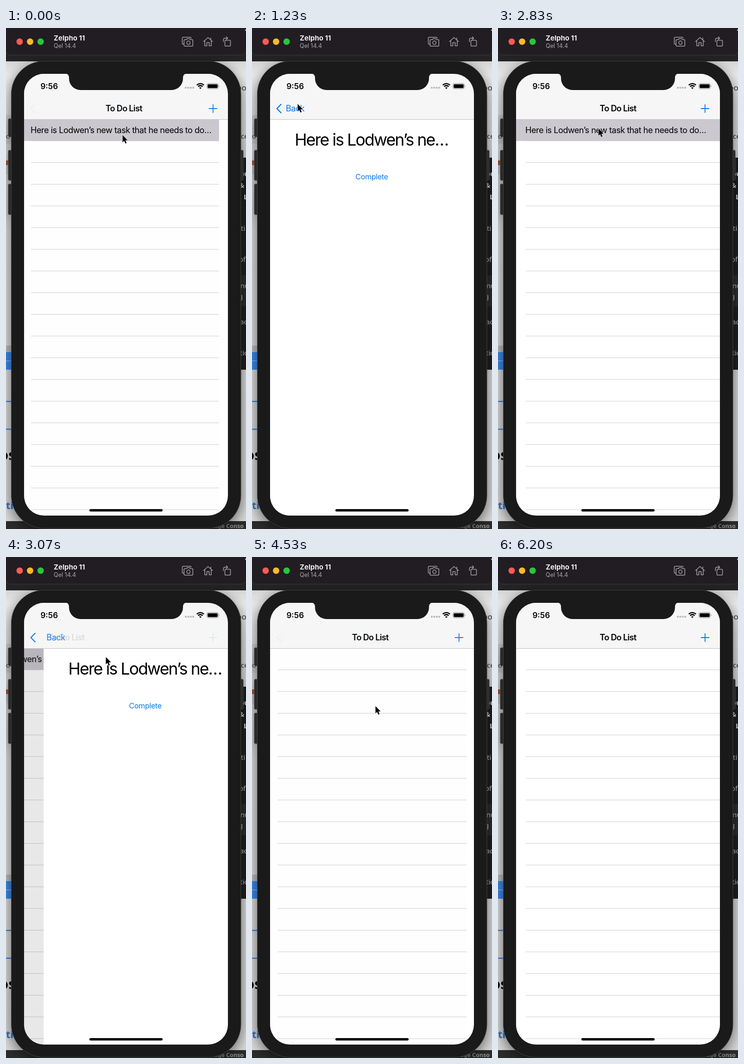
An HTML page that plays this animation: 518x1082 px, repeating every 6.31 s.

```html
<!DOCTYPE html>
<html lang="en">
<head>
<meta charset="utf-8">
<title>To Do List</title>
<style>
  /* 0 = list on screen, 1 = detail on screen */
  @property --p { syntax: '<number>'; inherits: true; initial-value: 0; }

  html, body { margin: 0; width: 100%; height: 100%; overflow: hidden; background: #1c1c1c; }
  svg { display: block; width: 100vw; height: 100vh; }
  text { font-family: Inter, sans-serif; font-optical-sizing: none; white-space: pre; }
  .mid { text-anchor: middle; }
  .line { fill: none; stroke-linecap: round; stroke-linejoin: round; }
  .page text { font-family: "Noto Sans", sans-serif; }

  .phone { filter: drop-shadow(0 8px 15px rgba(0, 0, 0, .55)); }
  .body { font-size: 18.1px; letter-spacing: -.5px; }
  .blue { fill: #0a78ea; }

  .stage { animation: nav 6310ms infinite cubic-bezier(.2833, .99, .3183, .99); }
  .list { transform: translateX(calc(var(--p) * -132px)); }
  .dim { opacity: calc(var(--p) * .1); }
  .detail { transform: translateX(calc((1 - var(--p)) * 441px)); }
  .title { transform: translateX(calc(var(--p) * (-100px - var(--p) * 47px))); }
  .back { transform: translateX(calc((1 - var(--p)) * 150px)); }
  .out { opacity: calc(1 - var(--p)); }
  .in { opacity: var(--p); }
  .task { animation: task 6310ms infinite step-end; }
  .pick { animation: pick 6310ms infinite linear; }
  .cursor { animation: move 6310ms infinite linear; }

  @keyframes nav {
    0% { --p: .039; }
    7.83%, 22.98% { --p: 1; }
    30.9%, 45.54% { --p: 0; }
    53.46%, 67.67% { --p: 1; }
    75.6%, 100% { --p: 0; }
  }
  @keyframes task {
    0% { opacity: 1; }
    67%, 100% { opacity: 0; }
  }
  @keyframes pick {
    0%, 22.98% { opacity: 1; }
    28.5%, 44.3% { opacity: 0; }
    44.31%, 66.9% { opacity: 1; }
    67%, 100% { opacity: 0; }
  }
  @keyframes move {
    0% { transform: translate(251px, 231px); }
    7.1% { transform: translate(252px, 233px); animation-timing-function: ease-in-out; }
    19.5% { transform: translate(98px, 164px); }
    21.1% { transform: translate(91px, 167px); }
    25.5% { transform: translate(92px, 168px); animation-timing-function: ease-in; }
    31.7% { transform: translate(197px, 187px); animation-timing-function: ease-out; }
    37.5% { transform: translate(222px, 216px); }
    45.4% { transform: translate(216px, 217px); }
    48.65% { transform: translate(215px, 216px); animation-timing-function: ease-in; }
    58.2% { transform: translate(253px, 290px); animation-timing-function: ease-out; }
    63% { transform: translate(265px, 320px); }
    71.8% { transform: translate(266px, 322px); }
    78% { transform: translate(267px, 320px); animation-timing-function: ease-in; }
    82.9% { transform: translate(272px, 278px); }
    92.4% { transform: translate(456px, 0); }
    93.2%, 100% { transform: translate(457px, -30px); }
  }
</style>
</head>
<body>
<svg class="stage" viewBox="0 0 518 1082" preserveAspectRatio="none">
  <defs>
    <linearGradient id="paper" x2="0" y2="1">
      <stop offset="0" stop-color="#d6d6d6"/>
      <stop offset=".03" stop-color="#ebebeb"/>
      <stop offset=".16" stop-color="#dedede"/>
      <stop offset="1" stop-color="#dadada"/>
    </linearGradient>
    <clipPath id="screen"><rect x="39" y="99" width="440" height="954" rx="43"/></clipPath>
  </defs>

  <!-- windows behind -->
  <g class="page">
    <rect width="518" height="1082" fill="#252425"/>
    <rect y="72" width="518" height="993" fill="url(#paper)"/>
    <rect y="188" width="14" height="62" fill="#d2d2d2"/>
    <text x="0" y="239" font-size="15" fill="#444">o</text>
    <rect y="286" width="14" height="10" fill="#b85a38"/>
    <rect y="296" width="14" height="20" fill="#cfcfd2"/>
    <rect y="686" width="14" height="14" fill="#bdbdc0"/>
    <rect y="700" width="14" height="38" fill="#3b8aec"/>
    <rect y="718" width="14" height="2" fill="#7fb0e8"/>
    <g fill="#2672d2">
      <rect y="805.5" width="14" height="2"/>
      <rect y="865.5" width="14" height="2"/>
      <text x="0" y="1039" font-size="22" font-weight="700">ti</text>
    </g>
    <text x="-14" y="933" font-size="31" font-weight="800" fill="#080808">os</text>
    <g font-size="17" fill="#333">
      <text x="498" y="135">po</text>
      <text x="507" y="239" font-size="15">ce</text>
    </g>
    <rect x="480" y="280" width="38" height="458" fill="#202021"/>
    <rect x="480" y="534" width="38" height="67" fill="#2d2d2e"/>
    <g font-size="15" fill="#c4c4c4">
      <g font-weight="700" fill="#e4e4e4">
        <text x="505" y="320">ou</text>
        <text x="503" y="345">&amp;</text>
        <text x="513" y="370">L</text>
      </g>
      <text x="507" y="438">ti</text>
      <text x="503" y="505">ofi</text>
      <text x="506" y="562">nu</text>
      <text x="502" y="585">g</text>
      <text x="505" y="640">ac</text>
      <text x="505" y="707">tio</text>
    </g>
    <rect y="1065" width="518" height="17" fill="#2c2c2d"/>
    <text x="449" y="1080" font-size="12.5" font-weight="700" fill="#959595">age Conso</text>
  </g>

  <!-- phone body -->
  <g class="phone">
    <g fill="#29292a" stroke="#474748">
      <rect x="5" y="196" width="10" height="39" rx="2"/>
      <rect x="5" y="264" width="10" height="65" rx="2"/>
      <rect x="5" y="337" width="10" height="66" rx="2"/>
      <rect x="502" y="264" width="10" height="64" rx="2"/>
    </g>
    <rect x="11.5" y="71.5" width="495.5" height="1009" rx="71" fill="#1a1a1b" stroke="#444445"/>
  </g>

  <g clip-path="url(#screen)">
    <g class="list">
      <rect x="39" y="99" width="441" height="954" fill="#fff"/>
      <path d="M270 243.2V1045" stroke="#cdcdd0" stroke-width="420" stroke-dasharray="1 45.85"/>
      <g class="task">
        <rect class="pick" x="39" y="198" width="441" height="46" fill="#cbc8cf"/>
        <text class="body" x="59" y="227.3">Here is Lodwen’s new task that he needs to do…</text>
      </g>
      <rect class="dim" x="39" y="99" width="441" height="954"/>
    </g>

    <g class="detail">
      <rect x="39" y="99" width="441" height="954" fill="#fff"/>
      <text class="mid" x="257.8" y="253.5" font-size="35.5" letter-spacing="-1.85">Here is Lodwen’s ne…</text>
      <text class="mid blue" x="258.5" y="326.6" font-size="16" letter-spacing="-.3">Complete</text>
    </g>

    <!-- navigation bar -->
    <rect x="39" y="99" width="441" height="98" fill="#f6f6f7"/>
    <rect x="39" y="197" width="441" height="1" fill="#bfbfc2"/>
    <g class="out">
      <text class="title mid" x="259" y="180.2" font-size="18.1" font-weight="600" letter-spacing="-.7">To Do List</text>
      <path class="line" d="M438.3 174h17M446.8 165.5v17" stroke="#0a78ea" stroke-width="1.8"/>
    </g>
    <g class="in">
      <path class="line" d="M62.5 165l-8.8 9 8.8 9" stroke="#0a78ea" stroke-width="2.5"/>
      <text class="back body blue" x="73" y="180.2">Back</text>
    </g>

    <!-- status bar -->
    <path d="M128 98.5a8 8 0 0 1 8 8v2.5a25 25 0 0 0 25 25H357a25 25 0 0 0 25-25v-2.5a8 8 0 0 1 8-8z" fill="#1a1a1b"/>
    <text x="74.5" y="132" font-size="17" font-weight="600">9:56</text>
    <g fill="#bcbcbe">
      <rect x="386" y="127" width="4" height="4" rx="1.2"/>
      <rect x="391.4" y="127" width="4" height="4" rx="1.2"/>
      <rect x="396.8" y="127" width="4" height="4" rx="1.2"/>
      <rect x="402.2" y="127" width="4" height="4" rx="1.2"/>
    </g>
    <g fill="none" stroke="#000" stroke-width="2.5">
      <path d="M411.7 123.3q7.8-6.6 15.6 0"/>
      <path d="M414.6 126.5q4.9-4.2 9.8 0"/>
    </g>
    <path d="M416.9 129q2.6-2 5.2 0l-2.6 2.7z"/>
    <rect x="433.6" y="119.8" width="24.8" height="11.6" rx="3.2" fill="none" stroke="#8d8d8f"/>
    <rect x="435.2" y="121.4" width="21.6" height="8.4" rx="1.8"/>
    <path d="M459.6 123.7q2.4 1.9 0 3.8z" fill="#8d8d8f"/>

    <rect x="180" y="1039" width="158" height="5.2" rx="2.6"/>
  </g>

  <!-- window bar -->
  <rect x="-1" y="-14" width="520" height="72.5" rx="11" fill="#211d22" stroke="#3b383c"/>
  <circle cx="29.5" cy="29.5" r="6.9" fill="#ff5a52"/>
  <circle cx="52" cy="29.5" r="6.9" fill="#fdb92b"/>
  <circle cx="74.7" cy="29.5" r="6.9" fill="#29c63f"/>
  <text x="103" y="27.3" font-size="15" font-weight="700" fill="#f1eff1">Zelpho 11</text>
  <text x="103" y="43.3" font-size="12.6" fill="#aaa6ab">Qel 14.4</text>
  <g class="line" stroke="#a5a0a6" stroke-width="1.5">
    <path d="M383.5 35h-1q-2 0-2-2V22q0-2 2-2h15q2 0 2 2"/>
    <path d="M386.3 25h3.2l1.8-2h5l1.8 2h3.2q2 0 2 2v10.2q0 2-2 2h-15q-2 0-2-2V27q0-2 2-2z"/>
    <circle cx="393.8" cy="31.8" r="3.7"/>
    <path d="M426.3 29.3l9.7-8.8 9.7 8.8M429 27.5v11h4.5v-7h5v7h4.5v-11M442 21.5v4"/>
    <rect x="472.5" y="26.5" width="12" height="12.5" rx="1.8"/>
    <path d="M469.3 29.5v-4q0-3.5 3.5-3.5h5.4M475.5 19l3 3-3 3"/>
  </g>
  <circle cx="517.3" cy="4.8" r="1.2" fill="#eee"/>

  <g class="cursor">
    <path d="M.5 0v15.8l3.5-3.3 2.5 5.9 2.7-1.1-2.5-5.8h4.9z" stroke="#fff" stroke-width="1.5" stroke-linejoin="round" paint-order="stroke"/>
  </g>
</svg>
</body>
</html>
```
